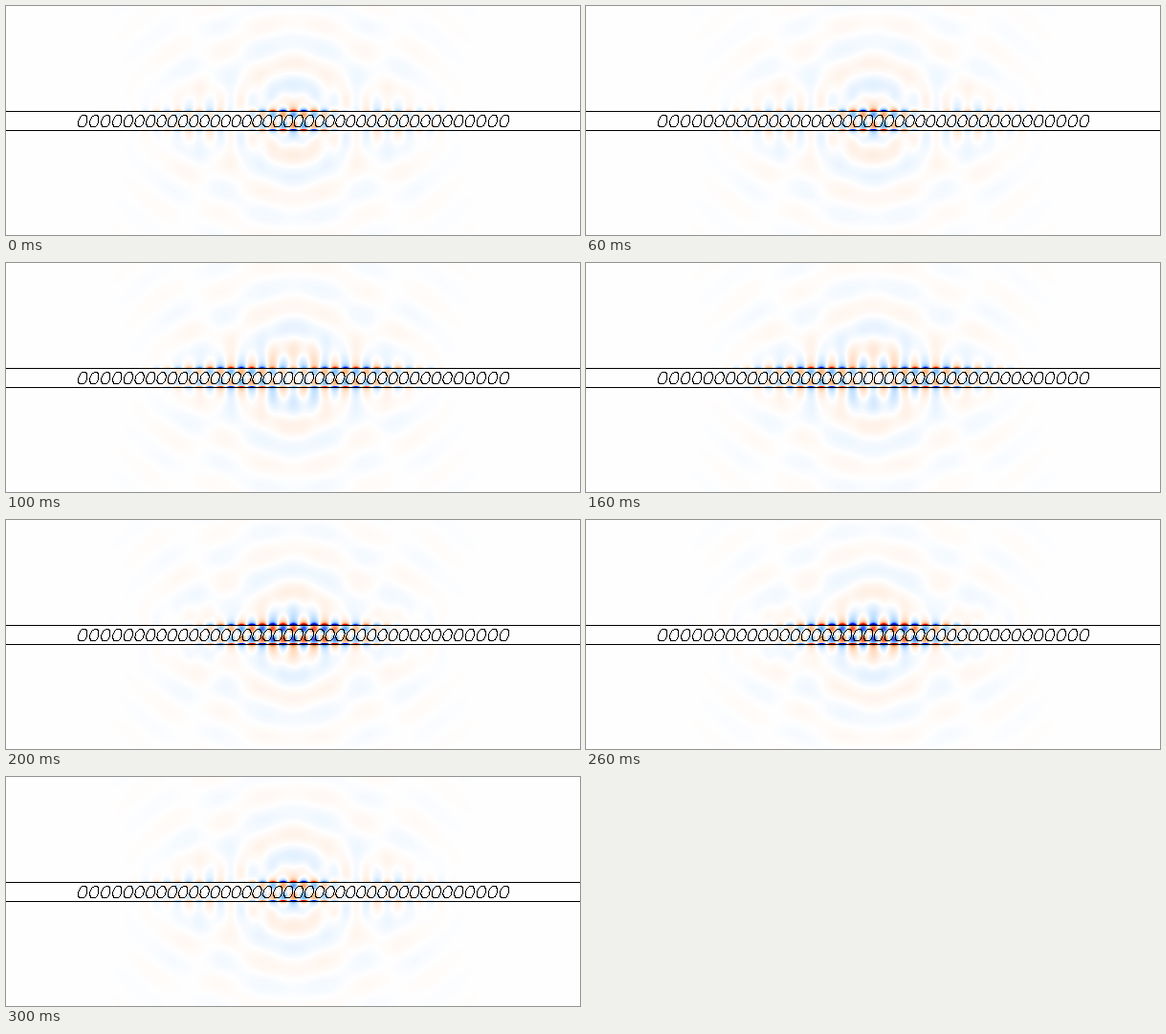
Write a matplotlib script that moves like this. It is 600x240 px and loops after 0.4 s.

```python
import numpy as np
import matplotlib.pyplot as plt
from matplotlib.animation import FuncAnimation
from matplotlib.colors import LinearSegmentedColormap

W, H = 600, 240
CX, CY, HALF = 300, 120, 10

cmap = LinearSegmentedColormap.from_list("field", [
    (0.0, (0, 0, 0.5)), (0.2, (0, 0, 1)), (0.36, (0.5, 0.75, 1)),
    (0.5, (1, 1, 1)),
    (0.64, (1, 0.72, 0.5)), (0.8, (1, 0, 0)), (1.0, (0.5, 0, 0))], N=512)

px, py = np.meshgrid(np.arange(W), np.arange(H))
X, Y = px - CX, py - CY
V = Y + 1                                   # the field sits a pixel higher
above = np.where(V < 0, 1.0, -1.0)
gap = np.clip(np.abs(V) - HALF, 0, None)
inside = np.abs(V) < HALF


def site(i):
    """Offset of lattice site i; the pitch widens towards the ends."""
    return 10.85 * i + 0.0012 * i ** 3


steps = np.linspace(-30, 30, 601)
carrier = np.cos(np.pi * np.interp(X, site(steps), steps))

# beam edges and slanted holes as one-pixel contours
solid = np.abs(Y - 0.5) < HALF
for i in np.arange(-19.5, 20):
    u = X - site(i) - 0.5 + 0.2 * (Y - 0.5)
    solid &= (u / 4.4) ** 2 + ((Y - 0.5) / 6.4) ** 2 >= 1
outline = np.zeros((H, W), bool)
outline[:, :-1] |= solid[:, :-1] != solid[:, 1:]
outline[:-1] |= solid[:-1] != solid[1:]


def ring(mid, phase):
    r = np.hypot(X - mid, V)
    lift = np.sqrt(gap / (r + 1))
    return above * lift * np.exp(-r / 55) * np.cos(2 * np.pi * (r - 16) / 44 - phase)


def field(step):
    phase = 2 * np.pi * step / 3
    # the phase lags with distance from the centre of the cavity
    lag = np.radians(45 + 0.9 * (np.hypot(X, 12) - 12) + 4 * np.minimum(gap, 15))
    mode = np.exp(-(X / 95) ** 2) * np.cos(phase - lag) * carrier
    near = above * mode * (0.24 * np.exp(-gap / 9) + 0.75 * np.exp(-gap / 1.4))
    core = -0.5 * mode * np.sin(-np.pi * V / 11)
    waves = 0.13 * ring(0, phase)
    waves += 0.05 * (ring(-100, phase + 2.6) + ring(100, phase + 2.6))
    return np.where(inside, core, near + waves)


def picture(n):
    rgb = cmap((field(n % 3) + 1) / 2)[..., :3]
    rgb[outline] = 0
    return rgb


frames = [picture(n) for n in range(4)]

fig = plt.figure(figsize=(W / 100, H / 100), dpi=100)
ax = fig.add_axes([0, 0, 1, 1])
ax.axis("off")
image = ax.imshow(frames[0], interpolation="nearest", aspect="auto")


def draw(n):
    image.set_data(frames[n])
    return [image]


anim = FuncAnimation(fig, draw, frames=4, interval=100, repeat=True, blit=False)
plt.show()
```
